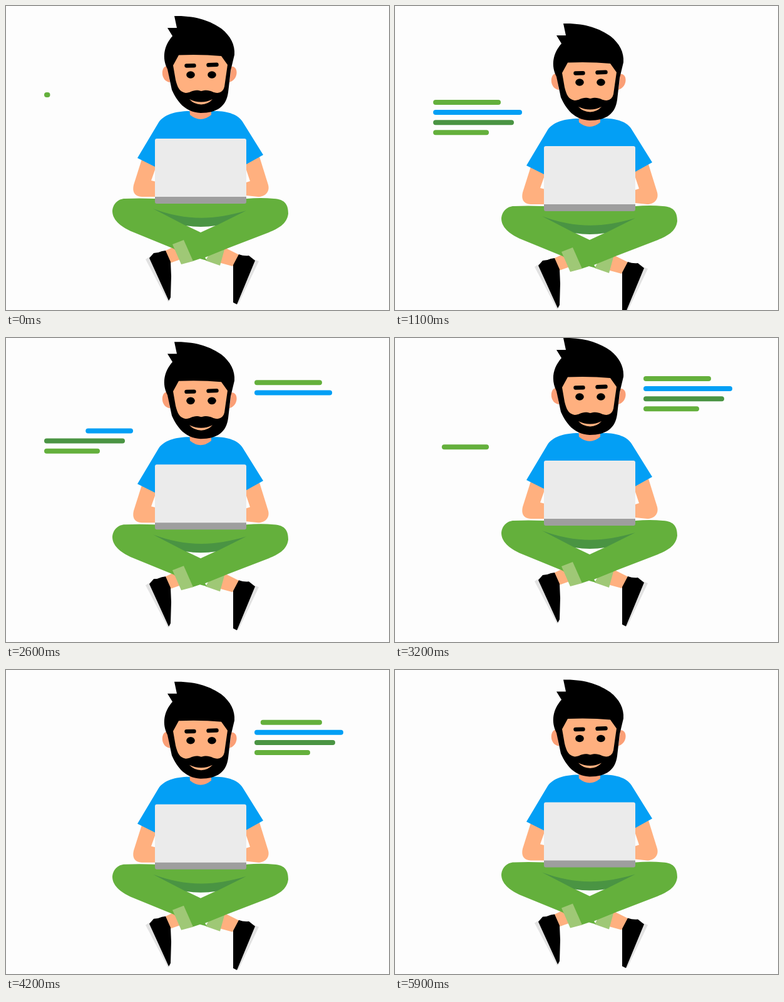
An HTML page with a canvas for the animation above (6 s loop, 612 px wide and 486 px high).

```html
<!DOCTYPE html>
<html lang="en">
<head>
<meta charset="utf-8">
<title>Coding at a laptop</title>
<style>
html, body { margin: 0; width: 100%; height: 100%; overflow: hidden; background: #fdfdfd; }
canvas { display: block; }
</style>
</head>
<body>
<canvas id="stage" width="612" height="486"></canvas>
<script>
const ctx = document.getElementById('stage').getContext('2d');
const LOOP = 6000, STEP = 100;
const BG = '#fdfdfd', SKIN = '#ffb07f', SHADE = '#fb9f76', GREEN = '#64b03c', DARK = '#4a9443',
      LIGHT = '#9fc876', BLUE = '#039ff5', BLACK = '#000', SOLE = '#e2e2e2';

const shape = (color, d) => ({ color, path: new Path2D(d) });

const figure = [
  // ankles and shoes
  shape(SKIN, 'M253 392L270 384L279 405L262 411Z'),
  shape(SKIN, 'M349 386L373 398L362 416L340 410Z'),
  shape(SOLE, 'M223 405L231 400L263 469L259 473Z'),
  shape(BLACK, 'M229 403L236 395Q243 395 249 392L255 391L263 409L264 432L263 466L260 471Z'),
  shape(SOLE, 'M396 405L404 408L372 475L368 477Z'),
  shape(BLACK, 'M372 397Q380 400 388 399L398 407L369 477L363 474L363 437L363 414Z'),
  // trousers
  shape(LIGHT, 'M326 394L350 386L342 415L319 407Z'),
  shape(GREEN, 'M190 308Q212 307 238 308H384Q408 306 428 308C447 309 451 319 451 332C449 349 434 356 420 362L355 387L318 402L321 407L310 404L298 408L280 398L268 388L202 361C186 354 171 344 170 329C170 317 179 308 190 308Z'),
  shape(BG, 'M286 350L311 362L337 350Z'),
  shape(DARK, 'M235 324C286 343 331 343 384 327L336 351Q311 355 287 351Z'),
  shape(LIGHT, 'M266 381L284 374L299 408L280 413Z'),
  // arms, shirt, neck
  shape(SKIN, 'M217 245L204 286C201 300 208 305 219 305H240V281L232 279L238 262V250Z'),
  shape(SKIN, 'M405 241L419 286C422 298 413 305 403 305L384 303V282L390 280L384 262V250Z'),
  shape(BLUE, 'M293 168C270 168 252 174 244 186L210 243L238 257V300H384V253L411 238L378 185C371 173 353 167 328 168Z'),
  shape(SHADE, 'M293 162H328V174Q311 188 294 174Z'),
  // laptop
  shape('#ebebeb', 'M241 212H381Q384 212 384 215V308H238V215Q238 212 241 212Z'),
  shape('#9e9e9e', 'M238 305H384V313Q384 316 381 316H241Q238 316 238 313Z'),
  // head
  shape(SHADE, 'M258 96C247 95 246 120 262 122ZM360 97C371 95 373 117 357 122Z'),
  shape(BLACK, 'M269 16C303 15 327 24 344 36C359 48 366 62 365 78L359 103L355 138C352 160 338 171 311 171C286 170 273 152 265 134L258 101C249 83 252 64 266 48L258 35L273 35Z'),
  shape(SKIN, 'M276 78.5Q312 77 344 80L354 94L349 129Q347 138 338 139C329 139 326 132 312 136C299 132 296 139 287 139C277 137 274 130 271 118L267 95Z'),
  shape(SKIN, 'M293 149Q312 158 330 149Q323 157 312 157.5Q300 157 293 149Z')
];

// [colour, length between cap centres]
const codeLines = [[GREEN, 100], [BLUE, 134], [DARK, 121], [GREEN, 81]];
const blocks = [
  { x: 65, y: 142, drawAt: -4, eraseAt: 2065 },
  { x: 401, y: 81, drawAt: 2096, eraseAt: 4165 }
];
const DRAW = 270, ERASE = 358;

// [time, vertical offset]
const bob = [[0, 0], [960, 14], [3130, -17.3], [4800, 14], [5900, -0.5], [LOOP, 0]];

const clamp = v => Math.min(1, Math.max(0, v));

function bobAt(t) {
  const i = bob.findIndex(key => key[0] > t);
  const [t0, y0] = bob[i - 1], [t1, y1] = bob[i];
  return y0 + (y1 - y0) * (t - t0) / (t1 - t0);
}

function stroke(color, width, x0, y0, x1, y1) {
  ctx.strokeStyle = color;
  ctx.lineWidth = width;
  ctx.beginPath();
  ctx.moveTo(x0, y0);
  ctx.lineTo(x1, y1);
  ctx.stroke();
}

function drawBlock({ x, y, drawAt, eraseAt }, t) {
  codeLines.forEach(([color, length], i) => {
    const end = clamp((t - drawAt - i * DRAW) / DRAW);
    const start = clamp((t - eraseAt - i * ERASE) / ERASE);
    const lineY = y + i * 16.1;
    if (end > start) stroke(color, 8, x + start * length, lineY, x + end * length, lineY);
  });
}

function drawFace(t) {
  stroke(BLACK, 6.4, 288.5, 95.5, 300.5, 95.3);
  stroke(BLACK, 6.4, 323.5, 94.3, 336.5, 93.8);
  const open = Math.min(1, 0.45 + Math.abs(t - 4900) / 200);
  ctx.fillStyle = BLACK;
  for (const x of [295, 329]) {
    ctx.beginPath();
    ctx.ellipse(x, 110, 6.8, 5.8 * open, 0, 0, Math.PI * 2);
    ctx.fill();
  }
}

function render(t) {
  ctx.fillStyle = BG;
  ctx.fillRect(0, 0, 612, 486);
  ctx.save();
  ctx.translate(0, bobAt(t));
  ctx.lineCap = 'round';
  for (const { color, path } of figure) {
    ctx.fillStyle = color;
    ctx.fill(path);
  }
  drawFace(t);
  blocks.forEach(block => drawBlock(block, t));
  ctx.restore();
}

const began = performance.now();
function tick() {
  const t = (performance.now() - began) % LOOP;
  render(Math.floor(t / STEP) * STEP);
  requestAnimationFrame(tick);
}
tick();
</script>
</body>
</html>
```
